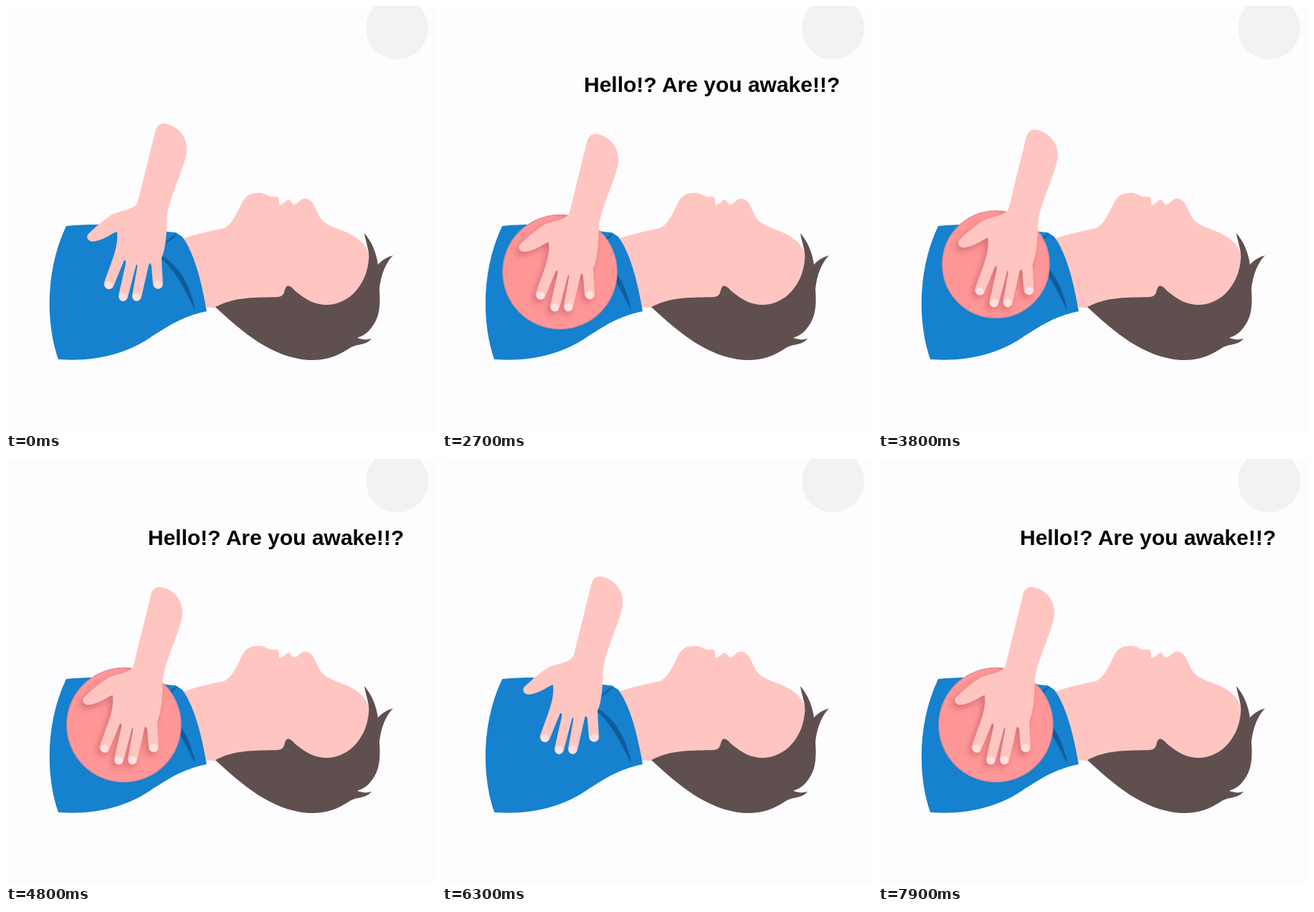
An HTML page that plays this animation: 600x593 px, repeating every 8000 ms.

```html
<!DOCTYPE html>
<html lang="en">
<head>
<meta charset="utf-8">
<title>Checking for a response</title>
<style>
  html, body { margin: 0; height: 100%; overflow: hidden; background: #fdfcfe; }
  svg { display: block; width: 100%; height: 100%; }
  text { font: bold 30px "Liberation Sans", Arial, sans-serif; fill: #050505; }
</style>
</head>
<body>
<svg viewBox="0 0 600 593">
  <defs>
    <path id="handShape" d="M208 176 C210 165 218 162 226 165 C245 171 254 187 252 205
      C247 230 231 260 225 290 C224 312 224 335 217 352 L219 388 C219 397 206 397 205 388
      L203 363 C202 358 200 358 199 362 L189 406 C187 414 176 414 176 404
      L183 365 C184 360 182 359 181 364 L170 406 C168 414 157 414 157 404
      L167 360 C168 354 166 353 164 357 L150 391 C147 398 135 395 137 386
      C147 356 157 338 155 315 C147 317 140 325 125 328 C118 330 111 326 114 319
      C125 308 139 296 150 290 C165 284 180 284 184 273 Z"/>
    <clipPath id="patchClip"><circle class="patch" cx="164.5"/></clipPath>
    <filter id="soft"><feGaussianBlur stdDeviation="5"/></filter>
  </defs>

  <circle cx="545.7" cy="31" r="43.5" fill="#f2f1f3"/>

  <path fill="#ffc6c1" d="M246 325 C265 318 285 314 304 310 C315 305 322 290 329 275
    C335 262 345 260 357 261 C364 263 368 267 374 266 C381 265 381 269 381 273
    C380 279 384 279 392 271 C395 269 397 271 399 275 C402 279 406 276 411 271
    C416 267 423 268 428 275 C434 284 436 296 446 303 C460 312 480 314 496 329
    C505 338 507 347 507 352 L511 380 L450 430 L293 421 L276 420 Z"/>
  <path fill="#5f504f" d="M500 317 C510 328 517 345 519 361 C524 355 532 350 540 348
    C530 358 523 375 521 395 C523 420 520 435 512 446 C506 455 500 460 490 463
    C498 466 504 466 510 464 C502 474 490 471 480 477 C460 490 445 495 422 494
    C370 490 330 455 292 420 C320 405 350 407 380 406 C391 404 387 395 392 391
    C396 389 400 394 404 398 C420 411 432 417 448 417
    C480 416 503 388 506 355 C508 343 502 330 500 317 Z"/>
  <path fill="#1681ce" d="M84 307 C110 304 145 305 165 306 C195 309 220 315 237 316 L246 322
    C263 345 273 385 280 426 C250 432 230 444 205 460 C170 485 125 497 73 493
    C56 445 54 370 84 307 Z"/>
  <path fill="#105c9b" d="M217 348 C241 362 258 390 264 425 C250 398 238 370 217 353 Z
    M239 317 C230 322 225 327 220 333 C228 328 233 325 239 317 Z"/>

  <g id="press">
    <circle class="patch" cx="164.5" fill="#ff9697" stroke="#e58c91" stroke-width="1.5"/>
    <g clip-path="url(#patchClip)">
      <g class="hand"><use href="#handShape" x="-4" y="5" fill="#a04048" opacity=".42" filter="url(#soft)"/></g>
    </g>
  </g>
  <g class="hand">
    <use href="#handShape" fill="#ffc6c1"/>
    <g fill="#fde1df">
      <ellipse cx="143.5" cy="389.5" rx="5.5" ry="5.5"/>
      <ellipse cx="163.5" cy="406" rx="5.5" ry="5.5"/>
      <ellipse cx="182.5" cy="405.5" rx="5.5" ry="5.5"/>
      <ellipse cx="212" cy="388.5" rx="5.5" ry="5.5"/>
    </g>
  </g>
  <text id="speech" x="198" y="120">Hello!? Are you awake!!?</text>
</svg>
<script>
  const LOOP = 8000, MOVE = 300;
  const rest  = { x: 0,    y: 0,    cy: 360.5, r: 74.5, press: 0, speech: 0 };
  const touch = { x: -1.5, y: 8.5,  cy: 360.5, r: 74.5, press: 1, speech: 0 };
  const shake = { x: -6,   y: 14.5, cy: 371,   r: 79.5, press: 1, speech: 1 };

  // Start time of each move and the pose it leads to
  const moves = [
    [600, touch], [1100, shake], [2800, rest], [3200, touch],
    [4000, shake], [6000, rest], [7000, touch], [7600, shake]
  ];

  const all = selector => document.querySelectorAll(selector);
  const press = document.getElementById("press");
  const speech = document.getElementById("speech");
  const easeOut = p => 1 - (1 - p) ** 3;

  function poseAt(time) {
    let from = rest, to = rest, start = 0;
    for (const [begin, pose] of moves) {
      if (begin > time) break;
      [from, to, start] = [to, pose, begin];
    }
    const k = easeOut(Math.min(1, (time - start) / MOVE));
    const pose = {};
    for (const key in rest) pose[key] = from[key] + (to[key] - from[key]) * k;
    return pose;
  }

  function draw(now) {
    const pose = poseAt(now % LOOP);
    for (const hand of all(".hand")) hand.setAttribute("transform", `translate(${pose.x} ${pose.y})`);
    for (const patch of all(".patch")) {
      patch.setAttribute("cy", pose.cy);
      patch.setAttribute("r", pose.r);
    }
    press.setAttribute("opacity", pose.press);
    speech.setAttribute("opacity", pose.speech);
  }

  const begin = performance.now();
  function tick() {
    draw(performance.now() - begin);
    requestAnimationFrame(tick);
  }
  tick();
</script>
</body>
</html>
```
